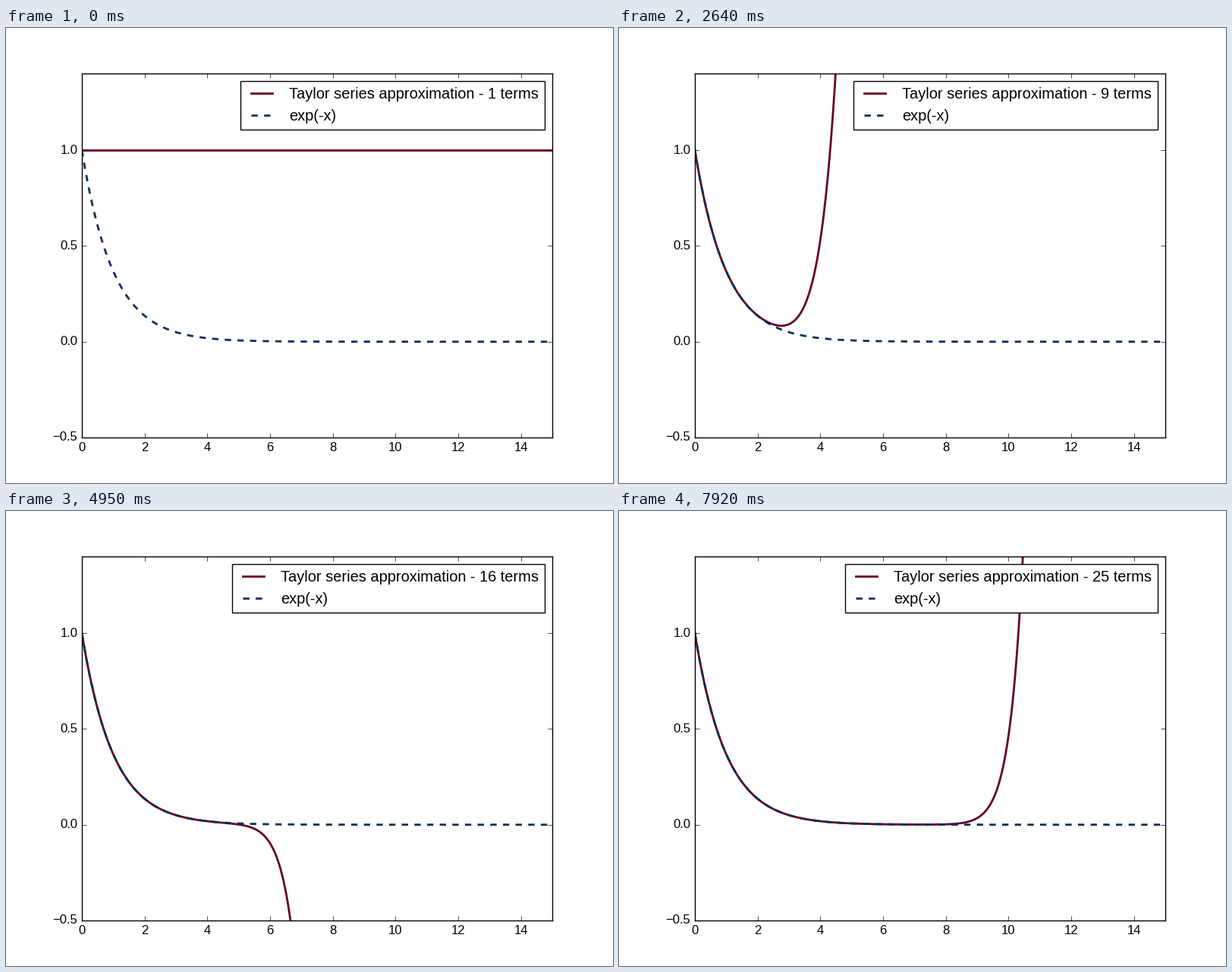
These frames come from a looping animation (800x600 px, 8 s). A matplotlib script:

```python
import math

import matplotlib.pyplot as plt
import numpy as np
from matplotlib.animation import FuncAnimation
from matplotlib.ticker import MultipleLocator

LOOP = 8000      # ms
INTERVAL = 20    # ms per drawn frame
STEP = 330       # ms before the next term is added

plt.style.use("classic")
plt.rcParams["font.family"] = "Liberation Sans"
plt.rcParams["savefig.dpi"] = 100

RED, BLUE = "#67001f", "#053061"
x = np.linspace(0, 15, 1000)


def taylor(terms):
    return sum((-x) ** k / math.factorial(k) for k in range(terms))


def label(terms):
    return f"Taylor series approximation - {terms} terms"


fig, ax = plt.subplots(figsize=(8, 6), dpi=100, facecolor="white")
fig.subplots_adjust(left=0.125, right=0.9, bottom=0.1, top=0.9)
series, = ax.plot(x, taylor(1), color=RED, lw=2, label=label(1))
ax.plot(x, np.exp(-x), "--", color=BLUE, lw=2, label="exp(-x)")
ax.set_xlim(0, 15)
ax.set_ylim(-0.5, 1.4)
ax.xaxis.set_major_locator(MultipleLocator(2))
ax.yaxis.set_major_locator(MultipleLocator(0.5))
title = ax.legend(loc="upper right").get_texts()[0]


def update(frame):
    # Half a frame of lead keeps each change on or just before its time.
    terms = 1 + int((frame + 0.5) * INTERVAL // STEP)
    series.set_ydata(taylor(terms))
    title.set_text(label(terms))
    return series, title


anim = FuncAnimation(fig, update, frames=LOOP // INTERVAL, interval=INTERVAL,
                     init_func=lambda: update(0), repeat=True, repeat_delay=0)
plt.show()
```
